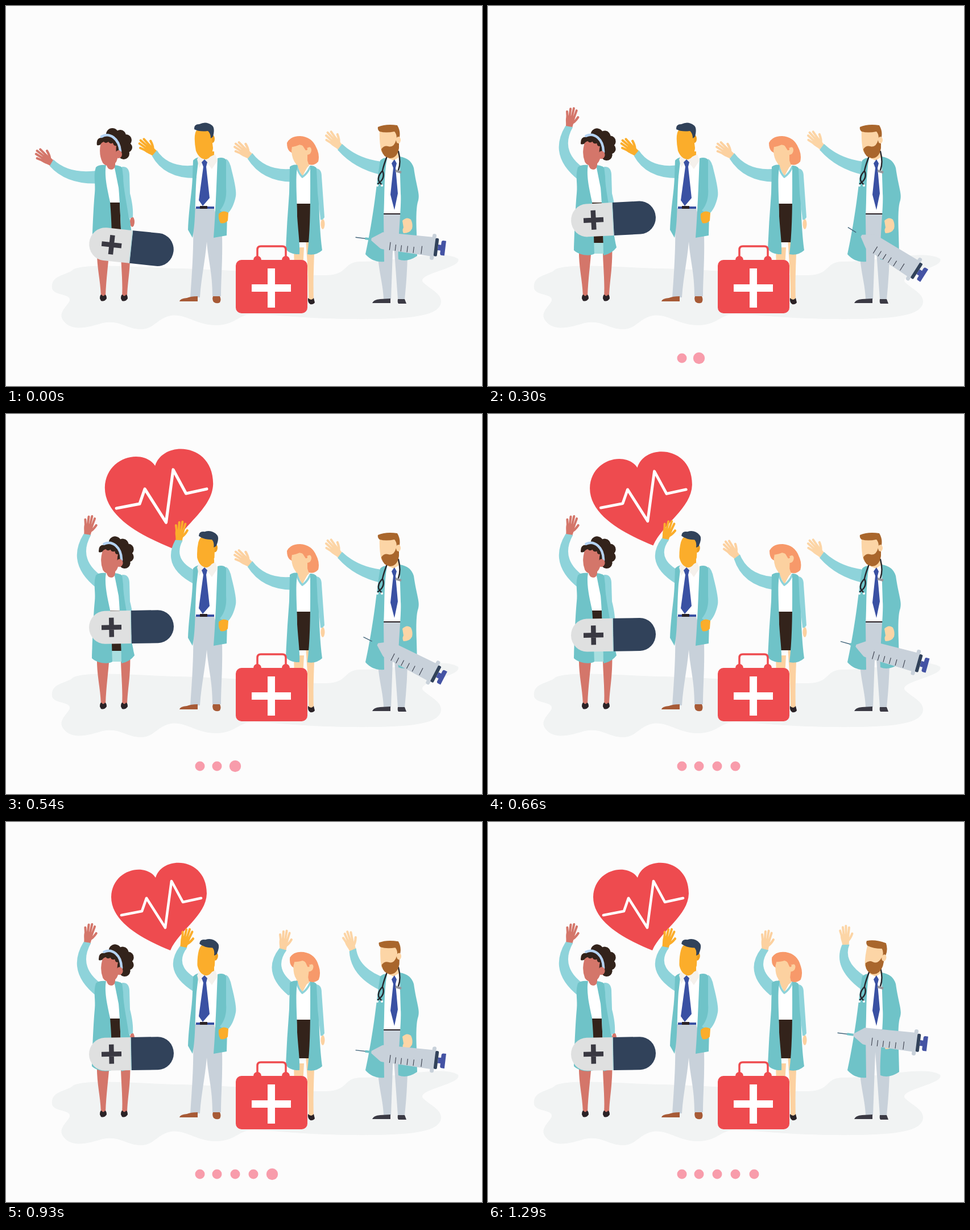
Animation, 837 px wide and 669 px high, one loop 1.8 s. Source, as an HTML page:

```html
<!DOCTYPE html>
<html lang="en">
<head>
<meta charset="utf-8">
<title>Waving medical team</title>
<style>
html, body { margin: 0; width: 100%; height: 100%; overflow: hidden; background: #fcfcfc; }
svg { display: block; width: 100%; height: 100%; }
.coat { fill: #6fc3c8; }
.sleeve { fill: #8ed3da; }
.navy { fill: #31425a; }
.gray { fill: #c8d1da; }
.dark { fill: #33231b; }
.shoe { fill: #2a2226; }
.red { fill: #ee4b4f; }
.white { fill: #fff; }
.blue { fill: #3a51a3; }
.line { fill: none; stroke-linecap: round; stroke-linejoin: round; }
</style>
</head>
<body>
<svg viewBox="0 0 837 669">
  <path fill="#f1f3f3" d="M81 497C78 473 108 474 118 464C140 452 230 460 300 462C400 464 500 474 560 474C605 474 590 450 625 450C690 449 770 428 795 445C803 462 715 472 735 488C748 500 770 508 764 526C755 548 700 552 600 551C520 550 480 544 440 542C410 540 405 562 370 562C335 562 315 541 290 545C265 550 260 570 236 569C210 568 200 552 170 558C150 564 125 572 108 561C92 548 96 540 108 525C125 505 84 512 81 497Z"/>

  <g id="heart">
    <path class="red" d="M263 98C275 58 353 61 353 126C352 165 305 190 289 226C250 210 185 180 185 132C186 84 244 70 263 98Z"/>
    <path class="line" stroke="#fff" stroke-width="4.6" d="M203 164L239 157L247 134L280 186L291 104L311 141L343 134"/>
  </g>

  <g fill="#d4766a">
    <g class="arm"></g>
    <path d="M160 425H182C180 455 176 480 175 512H167C166 480 159 460 160 425ZM202 415H218C220 460 214 480 213 512H204C206 480 201 450 202 415Z"/>
    <path class="shoe" d="M165 515Q165 508 168 508Q171 513 174 508Q177 509 177 515Q173 521 167 519ZM202 515Q202 508 205 508Q208 513 211 508Q214 509 214 515Q210 521 204 519Z"/>
    <path fill="#a9dfe0" d="M184 400H203V436H186Z"/>
    <path class="dark" d="M181 344H200L203 417H185Z"/>
    <path class="white" d="M172 284H197L200 346H182C180 320 173 310 172 284Z"/>
    <ellipse cx="222" cy="380" rx="4" ry="9"/>
    <path class="coat" d="M158 284Q163 279 176 280C172 300 180 330 183 345C186 380 186 410 187 436C180 441 160 439 151 430C152 395 154 350 156 330C158 312 153 300 158 284ZM190 280Q203 280 210 290C212 330 218 390 226 425Q218 436 203 439C203 400 200 340 198 320Z"/>
    <path class="sleeve" d="M204 283Q216 282 217 296L218 330C222 345 224 360 223 372L216 374C213 350 206 320 206 300Z"/>
    <path d="M177 270H192V280Q191 288 185 288Q178 287 177 280Z"/>
    <g class="head">
      <g class="dark">
        <circle cx="187" cy="226" r="11"/><circle cx="201" cy="228" r="10"/><circle cx="211" cy="236" r="10"/>
        <circle cx="213" cy="249" r="9"/><circle cx="207" cy="260" r="10"/><circle cx="199" cy="244" r="15"/>
      </g>
      <path d="M166 245Q166 238 172 238L197 240V262Q196 276 188 280Q176 284 170 276Q163 262 166 245Z"/>
      <path class="dark" d="M160 245Q158 233 167 232Q175 224 186 229Q198 236 198 255L194 262Q193 252 194 246Q189 247 188 241Q183 244 180 239Q175 243 172 239Q168 240 166 244Q163 246 160 245Z"/>
      <path class="line" stroke="#b5d3f3" stroke-width="4.5" stroke-linecap="butt" d="M168 230C182 222 199 233 201 256"/>
      <ellipse cx="198" cy="261" rx="6" ry="7"/>
    </g>
  </g>

  <g fill="#fbad2b">
    <g class="arm"></g>
    <path class="gray" d="M332 356H366L380 405C381 450 378 480 378 511H363C363 470 356 450 353 415C350 450 343 480 341 513H324C328 460 330 420 329 390Z"/>
    <path fill="#a75a36" d="M305 520Q306 515 318 514Q325 511 337 511V520ZM364 511H376Q379 517 376 522Q370 525 365 521Q362 516 364 511Z"/>
    <path class="white" d="M336 270L374 266L368 354H333Z"/>
    <path class="blue" d="M334 353H366V357H334Z"/>
    <path class="shoe" d="M341 352H354V357H341Z"/>
    <path class="coat" d="M329 272Q332 268 339 266L335 300C332 340 334 380 328 408L320 394C322 350 327 330 328 300ZM372 268Q385 264 390 275V330L388 404L365 408C368 370 370 320 372 268Z"/>
    <path class="sleeve" d="M387 269Q394 273 397 290Q406 325 404 335C401 350 396 360 388 367L376 360Q389 345 387 320Z"/>
    <path d="M374 366Q382 358 391 364L390 378Q384 384 377 382Q373 375 374 366ZM341 256H366V263L350 271Z"/>
    <path fill="#f5f1ec" d="M339 264L349 270L340 285L336 270ZM349 270L368 261L372 272L362 287Z"/>
    <path class="blue" d="M344 275L349 270L354 275L352 283L358 338L346 352L339 342L347 283Z"/>
    <g class="head">
      <ellipse fill="#ee9f20" cx="363" cy="234" rx="4" ry="7"/>
      <path d="M332 228Q333 217 340 217H360L364 250Q362 268 352 270Q340 270 334 255Q331 240 332 228Z"/>
      <path class="navy" d="M331 217Q330 208 340 208Q352 202 362 210Q368 214 364 230L360 233Q360 224 355 220Q340 222 331 217Z"/>
    </g>
  </g>

  <g fill="#fcd1a0">
    <g class="arm"></g>
    <path d="M527 410H543C541 460 540 490 541 518H532C533 490 529 440 527 410ZM506 425H524L520 500H508Z"/>
    <path class="shoe" d="M531 514Q537 520 541 514L543 522Q540 526 535 525Q530 522 531 514Z"/>
    <path class="dark" d="M511 346H537V416H513Z"/>
    <path class="white" d="M509 282H538L537 348H511Z"/>
    <path d="M510 278H533L521 300Z"/>
    <path class="line" stroke="#8ed3da" stroke-width="3.5" d="M511 281Q514 294 521 301Q530 295 535 283"/>
    <ellipse cx="557" cy="384" rx="3.5" ry="9"/>
    <path class="coat" d="M499 283Q505 278 513 280C508 300 512 340 512 370C514 400 517 420 516 437Q500 438 492 428Q494 380 498 330ZM535 281Q546 280 549 292L551 370Q553 410 556 430Q545 440 530 437C536 390 535 330 535 281Z"/>
    <path class="sleeve" d="M546 286Q555 287 555 300L560 372Q556 378 553 376L548 330Z"/>
    <g class="head">
      <path fill="#f7996a" d="M494 241Q500 229 517 229Q538 230 546 250Q552 262 549 274Q541 283 529 278L502 258Q494 255 494 241Z"/>
      <path d="M503 247Q512 239 530 250Q536 246 537 253Q537 261 530 262V272L533 281L522 291L512 280Q503 272 502 255Z"/>
      <path class="line" stroke="#f7996a" stroke-width="4" d="M504 246Q514 244 519 240Q525 246 528 252"/>
    </g>
  </g>

  <g class="red">
    <path class="line" stroke="#ee4b4f" stroke-width="3.5" d="M442 447V429Q442 423 448 423H486Q492 423 492 429V447"/>
    <circle cx="442" cy="447" r="7"/><circle cx="492" cy="447" r="7"/>
    <rect x="404" y="447" width="126" height="94" rx="10"/>
    <path class="white" d="M460 462H473V490H501V503H473V531H460V503H432V490H460Z"/>
  </g>

  <g fill="#fcd5a6">
    <g class="arm"></g>
    <path class="gray" d="M663 366H695L706 440Q705 480 701 516H689L681 405L677 516H664C663 490 656 470 654 440Z"/>
    <path fill="#3b3a44" d="M644 523Q646 517 658 516L676 515V523ZM689 516H701L704 524H690Q688 521 689 516Z"/>
    <path class="white" d="M664 268L693 263L696 366H663Z"/>
    <path class="shoe" d="M664 365H695V367H664Z"/>
    <path class="coat" d="M658 272Q664 266 670 268C664 300 666 340 664 370L665 450Q645 452 632 437C638 410 645 370 650 330Q655 290 658 272ZM692 265Q712 268 717 285C722 320 728 330 725 342Q720 355 722 400L723 440Q705 452 690 446C688 420 696 350 694 330Z"/>
    <path d="M697 378Q705 370 712 376Q716 384 714 392Q710 400 699 400Q696 395 699 390ZM668 256H691V266L682 272L672 268Z"/>
    <path class="blue" d="M678 277L683 270L687 277L685 285L689 330L683 359L676 332L681 285Z"/>
    <path class="line" stroke="#26262c" stroke-width="2.4" d="M690 256Q695 275 690 289M671 262Q664 280 662 290Q652 301 656 309L660 314M662 290Q668 303 654 313"/>
    <path stroke="#96969b" stroke-width="4" d="M685 290L695 293"/>
    <circle class="white" cx="653" cy="316" r="2"/><circle class="white" cx="661" cy="316" r="2"/>
    <g class="head">
      <path d="M657 218H688L688 250L660 257Q656 240 657 218Z"/>
      <path fill="#a9662c" d="M654 213Q668 207 688 210Q694 220 692 231L687 233Q687 225 683 221Q668 224 657 221Q653 218 654 213ZM660 252Q665 245 672 247Q682 250 686 236L691 242V250Q688 268 675 268Q662 266 660 252Z"/>
      <ellipse cx="690" cy="236" rx="4" ry="6"/>
    </g>
  </g>

  <g id="capsule">
    <path fill="#dfe0e0" d="M0 -29H-46A28 29 0 0 0 -46 29H0Z"/>
    <path class="navy" d="M0 -29H47A28 29 0 0 1 47 29H0Z"/>
    <path stroke="#b9dcdf" stroke-width="1.5" d="M-.5 -29V29"/>
    <path stroke="#3a3942" stroke-width="8.5" d="M-52 0H-17M-34.5 -17V17"/>
  </g>

  <g id="syringe">
    <path stroke="#44667c" stroke-width="1.4" d="M-80 0H-62"/>
    <path class="coat" d="M-63 -2H-50V2H-63Z"/>
    <path class="gray" d="M-52 -2L-36 -13Q-34 -15 -30 -15L57 -17V17L-30 15Q-34 15 -36 13L-52 2Z"/>
    <path stroke="#3a3f4c" stroke-width="1.1" d="M-18 1V15M-8 4V15M2 4V15M13 4V15M24 4V15M38 1V15"/>
    <rect class="gray" x="54" y="-23" width="7" height="46" rx="3"/>
    <rect class="navy" x="60" y="-16" width="6" height="32" rx="2"/>
    <path fill="#4453a4" d="M66 -5H71V-10Q71 -13 74 -13H79V13H74Q71 13 71 10V5H66Z"/>
  </g>

  <g id="dots" fill="#f89cab"></g>
</svg>
<script>
const LOOP = 1800, STEP = 30;
const $ = id => document.getElementById(id);
const smooth = (t, a, b) => {
  const x = Math.min(1, Math.max(0, (t - a) / (b - a)));
  return x * x * (3 - 2 * x);
};
const mix = (a, b, p) => a + (b - a) * p;

// Eased value between [time, value] pairs
function track(t, ...keys) {
  let value = keys[0][1];
  for (let i = 1; i < keys.length; i++) {
    const [t0, v0] = keys[i - 1], [t1, v1] = keys[i];
    if (t >= t0) value = mix(v0, v1, smooth(t, t0, t1));
  }
  return value;
}

// Joint positions: elbow, wrist and hand angle as [resting, raised]
const people = [
  { shoulder: [170, 300], elbow: [[118, 298], [135, 259]], wrist: [[80, 276], [143, 212]], hand: [-53, 12],
    neck: "185 280", nod: 5, wave: [0, 310] },
  { shoulder: [340, 291], elbow: [[292, 286], [304, 258]], wrist: [[261, 259], [312, 220]], hand: [-50, 17],
    neck: "350 268", nod: 10, wave: [300, 610] },
  { shoulder: [506, 298], elbow: [[461, 291], [477, 262]], wrist: [[429, 264], [487, 224]], hand: [-52, 9],
    neck: "520 283", nod: 7, wave: [570, 880] },
  { shoulder: [664, 286], elbow: [[621, 273], [630, 252]], wrist: [[587, 248], [629, 216]], hand: [-43, -2],
    neck: "678 268", nod: 12, wave: [780, 1050], turn: [810, 1290] }
];

const HAND = `<g class="hand"><path d="M-5.5 3C-6 -6 -9 -9 -8.5 -17Q0 -21 7 -17L5.5 3Z"/>
  <path class="line" stroke-width="4" d="M-6.5 -16L-9 -25M-2.8 -17L-4 -31M1.3 -17L1.5 -33M5 -16L7 -30"/>
  <path class="line" stroke-width="4.2" d="M3 -6Q8 -9 12 -19"/></g><path class="sleeve"/>`;
const arms = document.querySelectorAll(".arm"), heads = document.querySelectorAll(".head");
arms.forEach(arm => {
  arm.innerHTML = HAND;
  arm.setAttribute("stroke", "none");
  const skin = arm.parentNode.getAttribute("fill");
  arm.querySelectorAll(".line").forEach(line => line.setAttribute("stroke", skin));
});

// Swing a bone of changing angle and length from its joint
function swing(from, [a0, b0], [a1, b1], p) {
  const v0 = [b0[0] - a0[0], b0[1] - a0[1]], v1 = [b1[0] - a1[0], b1[1] - a1[1]];
  const angle = mix(Math.atan2(v0[1], v0[0]), Math.atan2(v1[1], v1[0]), p);
  const length = mix(Math.hypot(...v0), Math.hypot(...v1), p);
  return [from[0] + length * Math.cos(angle), from[1] + length * Math.sin(angle)];
}

function offset(point, a, b, d) {
  const dx = b[0] - a[0], dy = b[1] - a[1], n = d / Math.hypot(dx, dy);
  return [point[0] - dy * n, point[1] + dx * n];
}

function drawArm(node, { shoulder: s, elbow, wrist, hand }, p) {
  const e = swing(s, [s, elbow[0]], [s, elbow[1]], p);
  const w = swing(e, [elbow[0], wrist[0]], [elbow[1], wrist[1]], p);
  const side = k => {
    const a = offset(s, s, e, 12 * k), m = offset(e, s, w, 9 * k), b = offset(w, e, w, 6.5 * k);
    const control = [0, 1].map(i => 2 * m[i] - (a[i] + b[i]) / 2);
    return [a, control, b];
  };
  const [a, c, b] = side(1), [a2, c2, b2] = side(-1);
  node.lastChild.setAttribute("d", `M${a}Q${c} ${b}L${b2}Q${c2} ${a2}Z`);
  node.firstChild.setAttribute("transform", `translate(${w}) rotate(${mix(...hand, p)})`);
}

const dots = [[341, 0], [371, 180], [403, 420], [435, 570], [468, 810]];
$("dots").innerHTML = dots.map(([x]) => `<circle cx="${x}" cy="620"/>`).join("");

function draw(t) {
  people.forEach((person, i) => {
    const p = smooth(t, ...person.wave);
    drawArm(arms[i], person, p);
    const turn = smooth(t, ...(person.turn || person.wave));
    heads[i].setAttribute("transform", `rotate(${person.nod * turn} ${person.neck})`);
  });

  const y = track(t, [0, 424], [120, 383], [300, 375], [540, 375], [810, 408]);
  const tilt = track(t, [0, 6], [120, -17], [300, -3], [540, -1]);
  $("capsule").setAttribute("transform", `translate(220 ${y}) rotate(${tilt})`);

  const spin = track(t, [0, 0], [330, 26], [420, 26], [810, 0]);
  const lift = 36 * smooth(t, 810, 1290);
  $("syringe").setAttribute("transform", `translate(663 ${439 - lift}) rotate(${spin}) translate(31 -22) rotate(7)`);

  const size = track(t, [360, 0], [570, 1.2], [720, 1]);
  $("heart").setAttribute("transform", `translate(269 149) scale(${size}) translate(-269 -149)`);

  dots.forEach(([, start], i) => {
    const r = track(t, [start, 0], [start + 120, 10.2], [start + 240, 8.5]);
    $("dots").children[i].setAttribute("r", r);
  });
}

const begin = performance.now();
function frame() {
  const t = (performance.now() - begin) % LOOP;
  draw(Math.floor(t / STEP) * STEP);
  requestAnimationFrame(frame);
}
frame();
</script>
</body>
</html>
```
